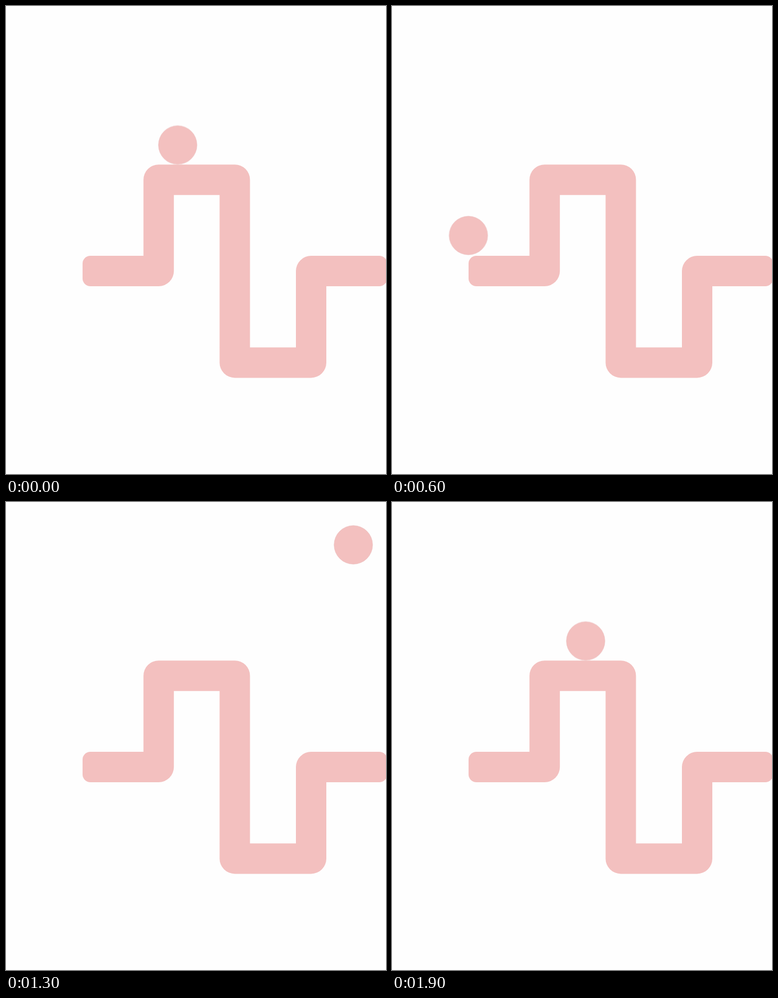
An HTML page for the animation above (2000 ms loop, 675 by 830 pixels).

```html
<!DOCTYPE html>
<html lang="en">
<head>
<meta charset="utf-8">
<title>Rolling ball</title>
<style>
  html, body { margin: 0; width: 100%; height: 100%; overflow: hidden; background: #fefefe; }
  svg { display: block; width: 675px; height: 830px; }
  .track { fill: none; stroke: #f3c0bf; stroke-width: 54; stroke-linejoin: round; }
  .cap { fill: #f3c0bf; }
  .ball {
    fill: #f3c0bf; stroke: #e9b9b9; stroke-width: .6;
    animation: roll 2s steps(1) infinite;
  }
  /* Ten poses a second: each segment takes one step per 100 ms. */
  @keyframes roll {
    0%   { transform: translate(305px, 246.5px); }
    5%   { transform: translate(273px, 246.5px); }
    10%  { transform: translate(244px, 252px); animation-timing-function: steps(2); }
    20%  { transform: translate(185px, 396px); }
    25%  { transform: translate(160px, 411px); }
    30%  { transform: translate(135.7px, 407px); }
    35%  { transform: translate(111px, 428px); }
    40%  { transform: translate(85.9px, 470.5px); animation-timing-function: steps(2); }
    50%  { transform: translate(87.1px, 695px); animation-timing-function: steps(2); }
    60%  { transform: translate(87px, 842px); }
    65%  { transform: translate(617px, 76px); animation-timing-function: steps(3); }
    80%  { transform: translate(419.2px, 193.5px); animation-timing-function: steps(2); }
    90%  { transform: translate(397.5px, 247.5px); }
    95%  { transform: translate(344px, 246.5px); }
    100% { transform: translate(305px, 246.5px); }
  }
</style>
</head>
<body>
<svg viewBox="0 0 675 830">
  <rect class="cap" x="136" y="443" width="60" height="54" rx="14"/>
  <rect class="cap" x="617" y="443" width="60" height="54" rx="14"/>
  <path class="track" d="M160 470H271.2V308.2H406.4V632.4H542V470H650"/>
  <circle class="ball" r="34.2"/>
</svg>
</body>
</html>
```
